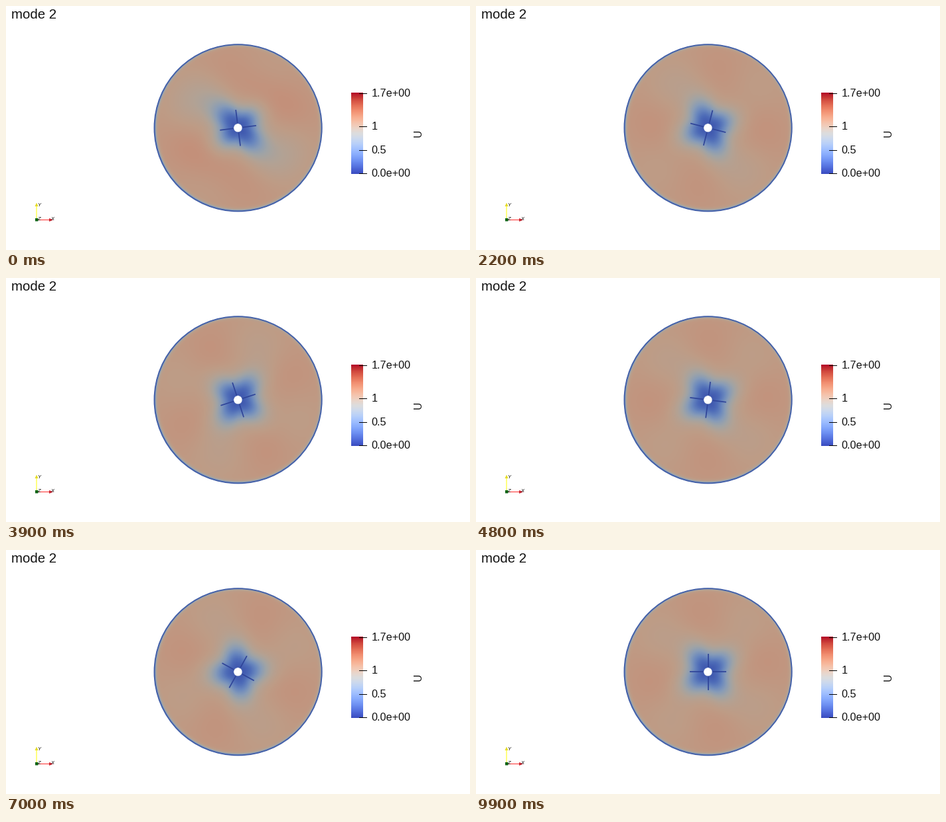
A matplotlib script for the animation above (10 s loop, 699 by 369 pixels).

```python
import numpy as np
import matplotlib.pyplot as plt
from matplotlib.animation import FuncAnimation
from matplotlib.patches import Circle, Polygon, Rectangle

W, H, DPI = 699, 369, 72
FRAMES, INTERVAL = 100, 100
CX, CY, R = 349.6, 184.3, 126.5
STEP = 7.2  # rotor degrees per frame

plt.rcParams["font.family"] = "Liberation Sans"
fig = plt.figure(figsize=((W + 1e-4) / DPI, (H + 1e-4) / DPI), dpi=DPI, facecolor="white")
ax = fig.add_axes([0, 0, 1, 1])
ax.axis("off")

# Shaded surface colours by speed
SPEED = [0, 0.2, 0.4, 0.58, 0.74, 0.87, 1.0, 1.14]
SHADES = np.array([
    (62, 86, 174), (78, 108, 184), (106, 136, 190), (136, 156, 183),
    (161, 164, 165), (179, 162, 148), (190, 156, 134), (197, 142, 120),
])

X0, Y0, SIZE = 221, 56, 258
px, py = np.meshgrid(X0 + 0.5 + np.arange(SIZE), Y0 + 0.5 + np.arange(SIZE))
rad = np.hypot(px - CX, py - CY)
theta = np.arctan2(CY - py, px - CX)
rim = 1 - np.exp(-(np.maximum(R - rad, 0) / 2.2) ** 1.2)


def wave(order, angle):
    return np.cos(order * (theta - np.radians(angle)))


def bump(center, width):
    return np.exp(-((rad - center) / width) ** 2)


def field(n):
    turn = STEP * (n + 1)
    start = 0.01 + 0.09 * np.exp(-n / 17)
    skew = wave(2, 143 + turn - STEP)
    core = (33.5 + 4.5 * wave(4, turn + 36)) * (1 + 1.4 * start * skew)
    speed = 1.03 * (1 - np.exp(-(rad / core) ** 2))
    speed += 0.05 * wave(4, turn + 8) * bump(90, 36)
    speed -= start * skew * bump(72, 34)
    speed *= rim
    rgb = [np.interp(speed, SPEED, SHADES[:, c]) for c in range(3)]
    return np.stack(rgb, axis=-1) / 255


disc = ax.imshow(field(0), extent=(X0, X0 + SIZE, Y0 + SIZE, Y0),
                 interpolation="nearest", aspect="auto", zorder=1)
disc.set_clip_path(Circle((CX, CY), R, transform=ax.transData))
ax.add_patch(Circle((CX, CY), R - 0.4, fill=False, ec="#4460a8", lw=1.9, zorder=2))
arms = [ax.plot([], [], color="#2f4499", lw=1.7, solid_capstyle="butt", zorder=3)[0]
        for _ in range(4)]
ax.add_patch(Circle((CX - 0.2, CY), 6.5, fc="white", ec="#5871b5", lw=0.6, zorder=4))


def label(x, y, text, size, **kw):
    ax.text(x, y, text, fontsize=size, color="#111111", **kw)


def box(x, y, w, h, color):
    ax.add_patch(Rectangle((x, y), w, h, fc=color, lw=0, snap=False))


label(8, 19, "mode 2", 20.4)

# Colour legend
ramp = np.linspace(1, 0, 122)[:, None]
ax.imshow(ramp, cmap="coolwarm", extent=(520, 537, 254, 132),
          interpolation="nearest", aspect="auto")
for y, text in [(132, "1.7e+00"), (182, "1"), (218, "0.5"), (253, "0.0e+00")]:
    box(532, y, 12, 1, "black")
    label(550.5, y + 5, text, 16.3)
label(621, 192, "U", 15.5, rotation=90, ha="center", va="center")

# Orientation axes
box(45.5, 303, 1, 19, "#ffff00")
box(47, 323, 19, 1, "#ff2a2a")
ax.add_patch(Polygon([(65, 321), (65, 326), (71, 323.5)], fc="#c8202c", lw=0))
ax.add_patch(Polygon([(43.5, 303), (48.5, 303), (46, 297.5)], fc="#e6dc28", lw=0))
box(44, 321, 4.5, 4.5, "#0b6414")
for x, y, text in [(47, 302.5, "Y"), (47, 323.5, "Z"), (67, 324, "X")]:
    label(x, y, text, 7.5, style="italic")

ax.set_xlim(0, W)
ax.set_ylim(H, 0)


def update(n):
    disc.set_data(field(n))
    for k, arm in enumerate(arms):
        a = np.radians(STEP * (n + 1) + 90 * k)
        reach = np.array([6, 27.5])
        arm.set_data(CX + reach * np.cos(a), CY - reach * np.sin(a))
    return [disc, *arms]


anim = FuncAnimation(fig, update, frames=FRAMES, interval=INTERVAL,
                     repeat=True, repeat_delay=0)
plt.show()
```
